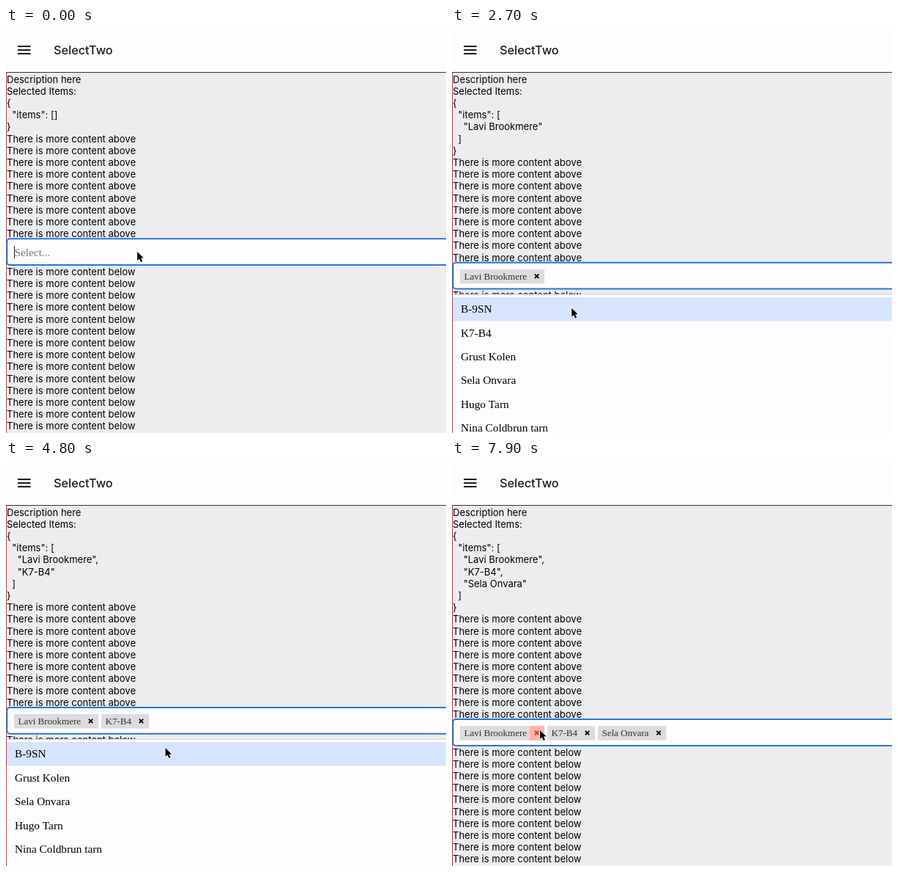
Recreate the animation shown at these times as an HTML page with a canvas. Size 600 by 552 pixels, loop 8 s.

```html
<!DOCTYPE html>
<html lang="en">
<head>
<meta charset="utf-8">
<title>SelectTwo</title>
<style>
  html, body { margin: 0; width: 100%; height: 100%; overflow: hidden; background: #eeecee; }
  canvas { display: block; }
</style>
</head>
<body>
<canvas id="stage" width="600" height="552"></canvas>
<script>
const ctx = document.getElementById('stage').getContext('2d');
const W = 600, H = 552, LOOP = 8000, STEP = 100, LINE = 16.2;
const SANS = '13px Inter, sans-serif';
const TITLE = '500 16.25px Inter, sans-serif';
const OPTION = '15.3px "Liberation Serif", serif';
const CHIP = '13px "Liberation Serif", serif';
const PAPER = '#fefcfe';

const people = ['Lavi Brookmere', 'B-9SN', 'K7-B4', 'Grust Kolen', 'Sela Onvara', 'Hugo Tarn', 'Nina Coldbrun tarn'];

// Each round: the menu opens, an option is pressed, then picked.
const rounds = [
  { open: 200, press: 800, pick: 1000, name: people[0] },
  { open: 2400, press: 3200, pick: 3400, name: people[2] },
  { open: 4500, press: 5500, pick: 5700, name: people[4] }
];

// Pointer stops: time, x, y
const stops = [
  [0, 179, 305], [500, 165, 352], [1100, 165, 352], [1600, 161, 392],
  [2000, 165, 338], [2300, 165, 338], [3000, 162, 410], [3700, 162, 410],
  [4300, 229, 358], [4600, 229, 358], [5100, 196, 452], [5500, 195, 454],
  [6900, 195, 454], [7000, 184, 453], [7200, 184, 453], [7500, 166, 488],
  [7900, 120, 367], [8000, 120, 367]
];

function pointerAt(t) {
  const i = stops.findIndex(s => s[0] > t);
  const [t0, x0, y0] = stops[i - 1], [t1, x1, y1] = stops[i];
  const p = (t - t0) / (t1 - t0), e = p * p * (3 - 2 * p);
  return { x: x0 + (x1 - x0) * e, y: y0 + (y1 - y0) * e };
}

function rect(x, y, w, h, color) {
  ctx.fillStyle = color;
  ctx.fillRect(x, y, w, h);
}

function text(str, x, y, font, color = '#000') {
  ctx.font = font;
  ctx.fillStyle = color;
  ctx.fillText(str, x, y);
}

function drawHeader() {
  rect(0, 0, W, 60, PAPER);
  rect(0, 60, W, 1, '#333');
  for (const y of [24, 29, 34]) rect(16, y, 17.5, 2, '#1c1b1d');
  text('SelectTwo', 65, 36, TITLE, '#1c1b1d');
}

function drawChip(name, x, top, pointer) {
  ctx.font = CHIP;
  const textEnd = x + 5.5 + ctx.measureText(name).width;
  const end = textEnd + 24;
  rect(x, top, end - x, 19.5, '#dddbdd');
  const hot = pointer.x > end - 20 && pointer.x < end && pointer.y > top && pointer.y < top + 19.5;
  if (hot) rect(end - 20, top, 20, 19.5, '#fdb3a5');
  text(name, x + 5.5, top + 13.8, CHIP, '#333');

  const cx = textEnd + 13.5, cy = top + 9.5, r = 2.7;
  ctx.strokeStyle = hot ? '#de350b' : '#000';
  ctx.lineWidth = 1.8;
  ctx.beginPath();
  ctx.moveTo(cx - r, cy - r); ctx.lineTo(cx + r, cy + r);
  ctx.moveTo(cx + r, cy - r); ctx.lineTo(cx - r, cy + r);
  ctx.stroke();
  return end + 4;
}

function drawInput(top, picked, pointer, caretOn) {
  ctx.beginPath();
  ctx.roundRect(1.3, top - 0.5, W + 20, 35.8, 4);
  ctx.fillStyle = PAPER;
  ctx.fill();
  ctx.strokeStyle = '#2378dc';
  ctx.lineWidth = 2;
  ctx.stroke();
  let x = 11;
  for (const name of picked) x = drawChip(name, x, top + 8.6, pointer);
  if (!picked.length) text('Select...', 11.5, top + 23, OPTION, '#7b7a7c');
  if (caretOn) rect(Math.round(x), top + 9, 1, 17.5, '#222');
}

function drawMenu(top, options, pointer, pressed) {
  rect(1, top + 42.5, W, H, '#d0ced1');
  rect(1, top + 43.5, W, H, PAPER);
  const rowTop = top + 47, rowHeight = 32.4;
  const focus = Math.max(0, Math.floor((pointer.y - rowTop) / rowHeight));
  options.forEach((name, i) => {
    const y = Math.round(rowTop + i * rowHeight);
    if (i === focus) rect(1, y, W, rowHeight, pressed ? '#a5cafb' : '#d6e4fe');
    text(name, 12, y + 21, OPTION);
  });
}

function drawPointer({ x, y }) {
  const shape = [[0, 0], [0, 12], [2.8, 9.4], [4.8, 14], [7, 13], [5, 8.6], [8.7, 8.6]];
  ctx.beginPath();
  for (const [dx, dy] of shape) ctx.lineTo(x + dx, y + dy);
  ctx.closePath();
  ctx.lineJoin = 'round';
  ctx.lineWidth = 1.8;
  ctx.strokeStyle = '#fff';
  ctx.stroke();
  ctx.fillStyle = '#000';
  ctx.fill();
}

function draw(t) {
  const pointer = pointerAt(t);
  const picked = rounds.filter(r => t >= r.pick).map(r => r.name);
  const active = rounds.find(r => t >= r.open && t < r.pick);
  const lines = [
    'Description here',
    'Selected Items:',
    ...JSON.stringify({ items: picked }, null, 2).split('\n'),
    ...Array(9).fill('There is more content above')
  ];
  const inputTop = 61 + LINE * lines.length;

  rect(0, 0, W, H, '#eeecee');
  drawHeader();
  rect(0, 61, 1, H, '#f22');
  lines.forEach((line, i) => text(line, 1, 74.5 + LINE * i, SANS));
  for (let y = inputTop + 49; y < H + LINE; y += LINE) text('There is more content below', 1, y, SANS);
  drawInput(inputTop, picked, pointer, t % 1000 < 500);
  if (active) {
    drawMenu(inputTop, people.filter(p => !picked.includes(p)), pointer, t >= active.press);
  }
  drawPointer(pointer);
}

function frame() {
  const t = performance.now() % LOOP;
  draw(Math.floor(t / STEP) * STEP);
  requestAnimationFrame(frame);
}
frame();
</script>
</body>
</html>
```
